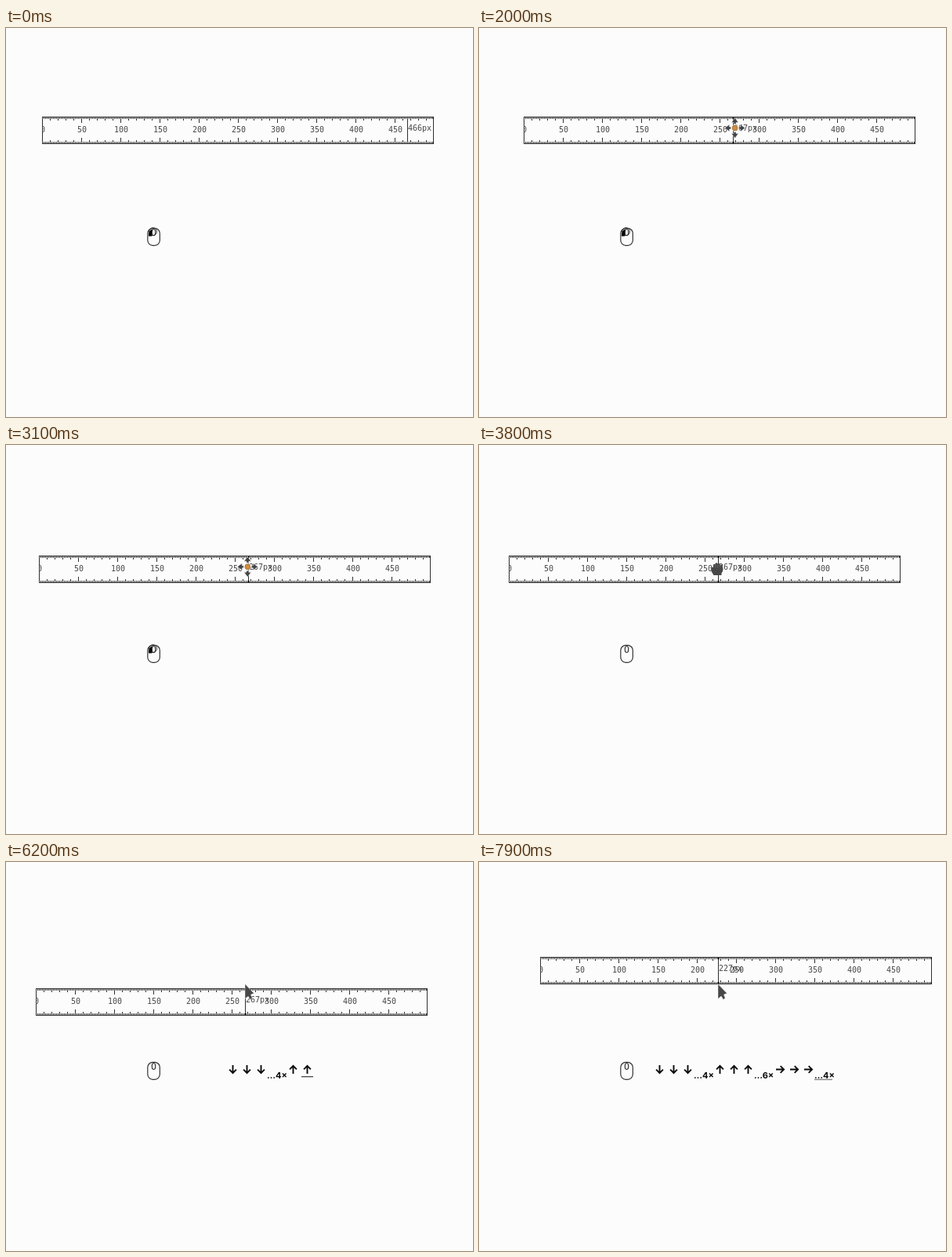
An HTML page that plays this animation: 596 px wide and 496 px high, repeating every 8 s.

```html
<!DOCTYPE html>
<html lang="en">
<head>
<meta charset="utf-8">
<title>Screen ruler</title>
<style>
html, body { margin: 0; width: 100%; height: 100%; overflow: hidden; background: #fcfcfc; }
svg { display: block; width: 596px; height: 496px; }
.mono { font: 10px "DejaVu Sans Mono", monospace; fill: #484848; }
.sub { font: 700 11px Inter, sans-serif; fill: #0a0a0a; }
.key { fill: none; stroke: #0a0a0a; stroke-width: 1.9; }
</style>
</head>
<body>
<svg viewBox="0 0 596 496">
  <defs>
    <clipPath id="inside"><rect width="500" height="35"/></clipPath>
  </defs>
  <rect width="596" height="496" fill="#fcfcfc"/>
  <g id="ruler">
    <rect x=".5" y=".5" width="499" height="34" fill="#fcfcfc" stroke="#303030"/>
    <g clip-path="url(#inside)">
      <path id="ticks" fill="#303030" shape-rendering="crispEdges"/>
      <g id="numbers" class="mono" text-anchor="middle"></g>
    </g>
    <g id="marker">
      <rect width="1" height="35" fill="#303030"/>
      <text id="label" class="mono" x="1" y="18"></text>
    </g>
  </g>
  <g fill="none" stroke="#333">
    <rect x="180.8" y="255.3" width="15.5" height="22" rx="6.5" stroke-width="1.2"/>
    <ellipse cx="188.5" cy="260.5" rx="2.2" ry="4" stroke-width="1.2"/>
    <g id="pressed">
      <path d="M182 265.5V262Q182.500 257.500 187 256.500L186 260.500V265.500Z" fill="#080808" stroke="none"/>
      <path d="M186 264.500A5 5 0 1 0 182.500 260" stroke-width="1"/>
    </g>
  </g>
  <g id="keys"></g>
  <g id="arrow"><path d="M0-1.500V17.500L4.200 14 6.800 18.500 9.200 16.500 7.500 12 11.500 10.500Z" fill="#484848" stroke="#fff" stroke-opacity=".7" stroke-width=".6"/></g>
  <g id="hand"><path d="M-5 8.500L-8 3.500V-1Q-6.500-3-5.500-1V-4.500Q-4.500-6.500-3-5V-6.500Q-1.500-8 0-6.500V-6Q1.500-7.500 3-5.500V-4Q5-6 6-4L7 .5Q7 4 5 6V8.500Z" fill="#484848"/><path d="M-2.700-5V-1M.3-5V-1M3.300-4V-1" stroke="#777" stroke-width=".6"/></g>
  <g id="move">
    <g id="tips" fill="#444" stroke="#fcfcfc" stroke-width=".5"></g>
    <circle r="4.600" fill="#fcfcfc" fill-opacity=".8"/>
    <circle r="3.400" fill="#d58a35" stroke="#9a7350" stroke-width=".9"/>
  </g>
</svg>
<script>
const $ = id => document.getElementById(id);
const LOOP = 8000, STEP = 100;

// [time, x, y]
const drag = [[1800, 47, 113], [1900, 51, 113], [2000, 57, 113], [2100, 64, 113], [2300, 125, 118],
  [2450, 142, 125], [2600, 124, 131], [2700, 78, 137], [2900, 50, 140], [3200, 38, 141]];
const approach = [[100, 524, 108], [400, 549, 79], [700, 538, 98], [900, 505, 124], [1600, 314, 127]];

const downs = [4900, 5100, 5300, 5500];
const ups = [6000, 6200, 6400, 6600, 6800, 7000];
const rights = [7300, 7500, 7700, 7900];
const groups = [{ times: downs, turn: 0 }, { times: ups, turn: 180 }, { times: rights, turn: -90 }];
const pressedBy = (times, t) => times.filter(k => k <= t).length;

function along(path, t) {
  if (t <= path[0][0]) return path[0].slice(1);
  for (let i = 1; i < path.length; i++) {
    const [t0, x0, y0] = path[i - 1], [t1, x1, y1] = path[i];
    if (t <= t1) {
      const p = (t - t0) / (t1 - t0);
      return [x0 + (x1 - x0) * p, y0 + (y1 - y0) * p];
    }
  }
  return path[path.length - 1].slice(1);
}

function rulerAt(t) {
  if (t < 1800) return [46, 113];
  const [x, y] = along(drag, t);
  return [Math.round(x) + 10 * pressedBy(rights, t),
    Math.round(y) + 10 * (pressedBy(downs, t) - pressedBy(ups, t))];
}

function buildRuler() {
  let d = "", text = "";
  for (let x = 0; x < 500; x += 2) {
    const h = x % 50 === 0 ? 8 : x % 10 === 0 ? 5 : 3;
    d += `M${x} 0h1v${h}h-1zM${x} 35h1v-${h}h-1z`;
    if (x % 50 === 0) text += `<text x="${x + 1}" y="20">${x}</text>`;
  }
  $("ticks").setAttribute("d", d);
  $("numbers").innerHTML = text;
  $("tips").innerHTML = [0, 90, 180, 270]
    .map(a => `<path transform="rotate(${a})" d="M0-13L4.500-7H1.500V-5H-1.500V-7H-4.500Z"/>`).join("");
}

function keysMarkup(t) {
  const live = groups.map(g => ({ n: pressedBy(g.times, t), turn: g.turn })).filter(g => g.n);
  if (!live.length) return "";
  const box = 15, gap = 3, subWidth = 23;
  const width = g => Math.min(g.n, 3) * (box + gap) - gap + (g.n > 3 ? subWidth : 0);
  const total = live.reduce((sum, g) => sum + width(g) + gap, -gap);
  const cy = live[0].n > 3 ? 264.5 : 266.5;
  let x = Math.round(336.5 - total / 2), out = "", line = "";
  for (const g of live) {
    for (let i = 0; i < Math.min(g.n, 3); i++) {
      out += `<path class="key" transform="translate(${x + 7.5} ${cy}) rotate(${g.turn})" d="M0-5.500V4.500M-4.400.2L0 4.600 4.400.2"/>`;
      line = [x, cy + 8.5, box, "#505050"];
      x += box + gap;
    }
    if (g.n > 3) {
      x -= gap;
      out += `<text class="sub" x="${x}" y="275.5">…${g.n}×</text>`;
      line = [x, 276.7, subWidth, "#858585"];
      x += subWidth + gap;
    }
  }
  const [lx, ly, lw, color] = line;
  return out + `<rect x="${lx}" y="${ly}" width="${lw}" height="1.4" fill="${color}"/>`;
}

function place(id, x, y) {
  $(id).setAttribute("transform", `translate(${x} ${y})`);
}

function show(id, on) {
  $(id).style.display = on ? "" : "none";
}

function draw(time) {
  const t = Math.floor((time % LOOP) / STEP) * STEP;
  const [rx, ry] = rulerAt(t);
  const dragging = t >= 1800 && t < 3600;
  let cx = 305, cy = 157;
  if (t < 1800) [cx, cy] = along(approach, t);
  const inside = cy >= ry && cy < ry + 35;

  let mark = 267;
  if (t < 1800) mark = t < 900 ? 466 : Math.round(cx) - 46;
  if (t >= 3600) mark = cx - rx;
  if (t >= 1600 && t < 1800) mark = 267;

  place("ruler", rx, ry);
  place("marker", mark, 0);
  $("label").textContent = mark + "px";
  $("keys").innerHTML = keysMarkup(t);

  if (dragging) {
    const [nx, ny] = along(drag, t + 30);
    place("move", nx + 267.5, ny + 14.5);
  }
  place("hand", cx - .5, cy + .5);
  place("arrow", cx, cy);
  show("move", dragging);
  show("hand", !dragging && t > 0 && inside);
  show("arrow", !dragging && t > 0 && !inside);
  show("pressed", t < 200 || (t >= 1700 && t < 3600));
}

buildRuler();
function tick() {
  draw(performance.now());
  requestAnimationFrame(tick);
}
tick();
</script>
</body>
</html>
```
